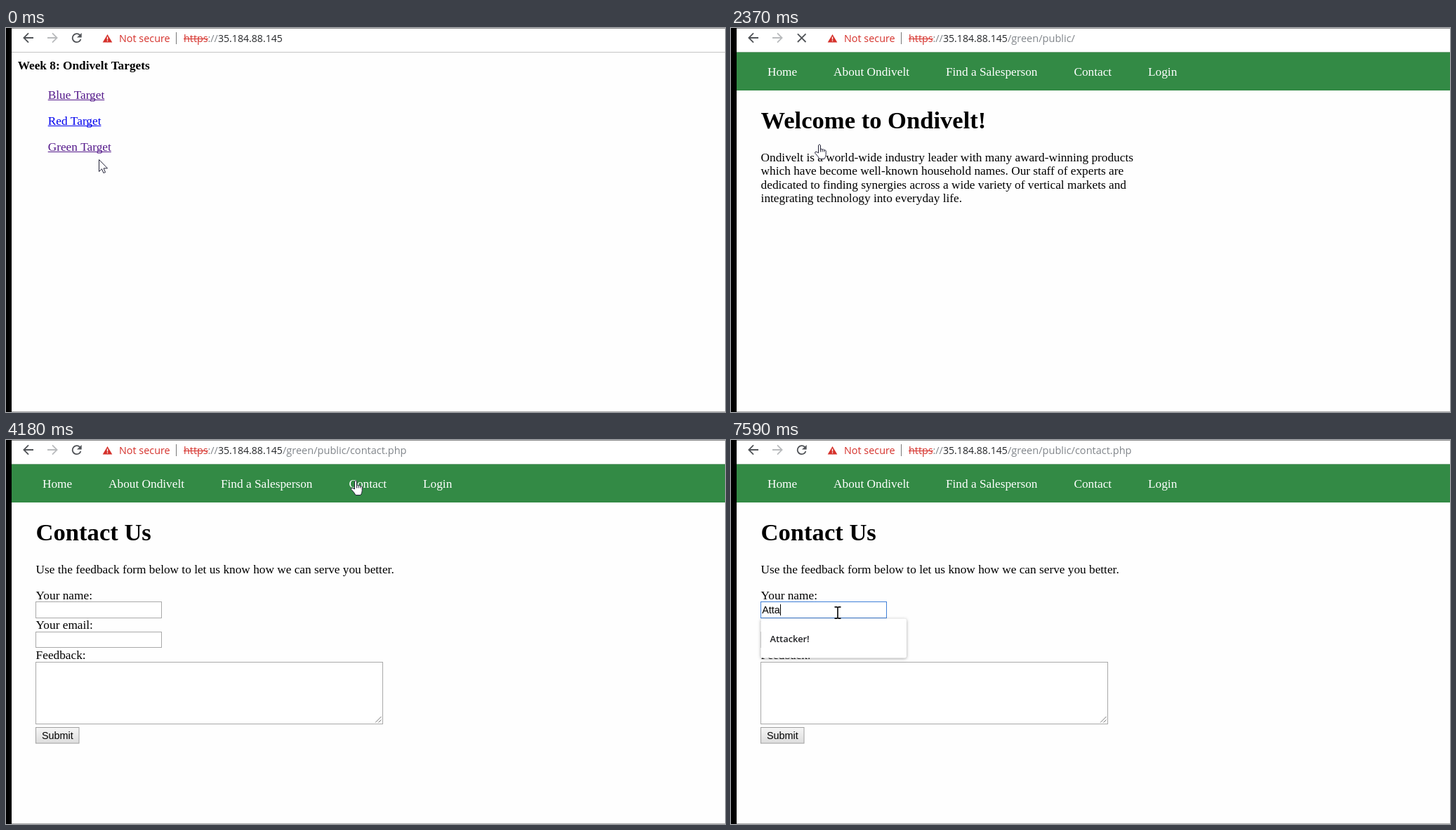
These frames come from a looping animation (1024x547 px, 8 s). An HTML page with a canvas:

```html
<!DOCTYPE html>
<html lang="en">
<head>
<meta charset="utf-8">
<title>Contact form walkthrough</title>
<style>
  html, body { margin: 0; width: 100%; height: 100%; overflow: hidden; background: #fefefe; }
  canvas { display: block; }
</style>
</head>
<body>
<canvas id="stage" width="1024" height="547"></canvas>
<script>
const ctx = document.getElementById('stage').getContext('2d');
const LOOP = 8000;
const EM = 17.3;
const BRAND = 'Ondivelt';
const EMAIL = 'tairil4173@example.com';

const serif = `${EM}px "Liberation Serif", serif`;
const sans = '14.4px "Liberation Sans", sans-serif';
const ui = (size, weight = 400) => `${weight} ${size}px "Open Sans", sans-serif`;

// Each entry holds from its start time until the next: [ms, kind, x, y]
const POINTER = [
  [0, 'arrow', 132.5, 187.5],
  [1150, 'arrow', 132.5, 185.5],
  [1290, 'arrow', 129.5, 180.5],
  [1415, 'hand', 122, 171],
  [1540, 'hand', 120, 167],
  [1690, 'hand', 119, 165],
  [2920, 'beam', 280, 132],
  [3070, 'arrow', 462.5, 98.5],
  [3200, 'arrow', 495.5, 76.5],
  [3350, 'hand', 490, 62],
  [3470, 'hand', 491, 57],
  [4580, 'arrow', 276.5, 195.5],
  [4720, 'arrow', 165.5, 211.5],
  [4840, 'beam', 152, 246]
];

// What the name field holds: [ms, text, caret x, caret visible]
const TYPING = [
  [5400, '', 45, true],
  [5960, '', 45, false],
  [6110, 'A', 53, true],
  [6670, 'A', 53, false],
  [6940, 'At', 57, true],
  [7340, 'Att', 62, true],
  [7590, 'Atta', 70, true]
];

const shapes = {
  arrow: new Path2D('M0 0V17L4 13.3L6.4 19L9 18L6.6 12.4H12Z'),
  hand: new Path2D('M5.5 13V2Q7 -.5 8.5 2V8Q9.8 6.3 11 8.3Q12.5 6.9 13.7 9Q15.3 8 16.2 10V15.5' +
    'Q16 18.5 14 21.5H7Q5 17.5 .8 13.4Q0 11.5 2 11.2Q4 11.8 5.5 13Z' +
    'M8.5 8V11.5M11 8.3V11.5M13.7 9V11.5'),
  beam: new Path2D('M-4.5 -8.2H-1.2L0 -7.2L1.2 -8.2H4.5M0 -7.2V7.2M-4.5 8.2H-1.2L0 7.2L1.2 8.2H4.5'),
  back: new Path2D('M7 0H-6.5M0 -6.6L-6.6 0L0 6.6'),
  cross: new Path2D('M-5.8 -5.8L5.8 5.8M5.8 -5.8L-5.8 5.8'),
  warning: new Path2D('M0 -5.8L6.8 5.8H-6.8Z')
};

const current = (keys, t) => keys.filter(key => key[0] <= t).pop();

function text(str, x, y, font, color = '#000') {
  ctx.font = font;
  ctx.fillStyle = color;
  ctx.fillText(str, x, y);
  return ctx.measureText(str).width;
}

function rect(x, y, w, h, color) {
  ctx.fillStyle = color;
  ctx.fillRect(x, y, w, h);
}

function box(x, y, w, h, border, fill = '#fff') {
  rect(x, y, w, h, border);
  rect(x + 1, y + 1, w - 2, h - 2, fill);
}

function strokeShape(path, x, y, color, width, flip = 1) {
  ctx.save();
  ctx.translate(x, y);
  ctx.scale(flip, 1);
  ctx.strokeStyle = color;
  ctx.lineWidth = width;
  ctx.stroke(path);
  ctx.restore();
}

function fillShape(path, x, y, color) {
  ctx.save();
  ctx.translate(x, y);
  ctx.fillStyle = color;
  ctx.fill(path);
  ctx.restore();
}

function reloadIcon(x, y) {
  ctx.strokeStyle = '#505357';
  ctx.lineWidth = 1.8;
  ctx.beginPath();
  ctx.arc(x, y, 6, 0.3, Math.PI * 1.77);
  ctx.stroke();
  fillShape(new Path2D('M7 -7.3V-.6H.3Z'), x, y, '#505357');
}

function toolbar(t) {
  const opening = t >= 4020 && t < 4180;
  const loading = opening || (t >= 2090 && t < 2520);
  const path = t >= 4020 ? '/green/public/contact.php' : t >= 2370 ? '/green/public/' : '';
  rect(8, 0, 1016, 34, '#fff');
  rect(8, 0, 1016, 1, '#8f8f8f');
  rect(8, 34, 1016, 1, '#c4c4c4');
  if (opening) rect(110, 7, 460, 17, '#f3f3f3');
  strokeShape(shapes.back, 32, 14, '#505357', 1.8);
  strokeShape(shapes.back, 66, 14, '#b9bbbd', 1.8, -1);
  if (loading) strokeShape(shapes.cross, 100.7, 14.2, '#505357', 1.8);
  else reloadIcon(100.7, 14.2);

  const red = '#d5302a', grey = '#80858a';
  fillShape(shapes.warning, 144.5, 14.8, red);
  rect(143.8, 12.5, 1.4, 4, '#fff');
  rect(143.8, 17.5, 1.4, 1.4, '#fff');
  text('Not secure', 161, 20, ui(14.4), red);
  rect(242, 6, 1, 17, '#777');
  text('https', 253, 20, ui(14.4), red);
  rect(253, 15, 35, 1, red);
  text('://', 287.5, 20, ui(14.3), grey);
  text('35.184.88.145', 302, 20, ui(14.1), '#25272a');
  text(path, 394, 20, ui(14.55), grey);
}

function link(label, y, color) {
  const width = text(label, 59.7, y, serif, color);
  rect(59.7, y + 1, width, 1, color);
}

function targetsPage(t) {
  const visited = '#551a8b';
  const pressed = t >= 1940 && t < 2090;
  text(`Week 8: ${BRAND} Targets`, 16.7, 58.5, 'bold ' + serif);
  link('Blue Target', 101, visited);
  link('Red Target', 138, '#0000ee');
  link('Green Target', 175, pressed ? '#ff0000' : visited);
}

function navBar() {
  rect(8, 34.5, 1016, 54.5, '#338a45');
  let x = 51.9;
  for (const label of ['Home', `About ${BRAND}`, 'Find a Salesperson', 'Contact', 'Login'])
    x += text(label, x, 68.3, serif, '#fff') + 3 * EM;
}

function article(title, lines) {
  navBar();
  text(title, 42.6, 143.3, `bold ${2 * EM}px "Liberation Serif", serif`);
  lines.forEach((line, i) => text(line, 42.6, 189.8 + i * 19.45, serif));
}

function homePage() {
  article(`Welcome to ${BRAND}!`, [
    `${BRAND} is a world-wide industry leader with many award-winning products`,
    'which have become well-known household names. Our staff of experts are',
    'dedicated to finding synergies across a wide variety of vertical markets and',
    'integrating technology into everyday life.'
  ]);
}

function popup(w, h) {
  ctx.save();
  ctx.shadowColor = 'rgba(0,0,0,.35)';
  ctx.shadowBlur = 4;
  ctx.shadowOffsetY = 1;
  ctx.fillStyle = '#fff';
  ctx.beginPath();
  ctx.roundRect(42.5, 254.5, w, h, 3);
  ctx.fill();
  ctx.restore();
}

function suggestions(typed) {
  const bold = ui(12.9, 600), plain = ui(13.3), grey = '#70757a';
  if (typed) {
    popup(207.5, 56);
    text('Attacker!', 55.5, 288, bold, '#202124');
    return;
  }
  popup(324, 140.5);
  ['Devkiram D Tairil', 'Devkiram'].forEach((name, i) => {
    text(name, 55.5, 288 + i * 39, bold, '#202124');
    text(EMAIL, 199, 288 + i * 39, plain, grey);
  });
  text('Manage...', 55.5, 379, plain, grey);
}

function contactPage(t) {
  const field = current(TYPING, t);
  article('Contact Us', ['Use the feedback form below to let us know how we can serve you better.']);
  ['Your name:', 'Your email:', 'Feedback:'].forEach((label, i) =>
    text(label, 42.6, 226.6 + i * 42.5, serif));
  box(42, 230, 180, 24, field ? '#3f7fd8' : '#a9a9a9');
  box(42, 273, 180, 23, '#a9a9a9');
  box(42, 316, 495, 89, '#a9a9a9');
  strokeShape(new Path2D('M526 402.5L534.5 394M530.5 402.5L534.5 398.5'), 0, 0, '#777', 1);

  const shade = ctx.createLinearGradient(0, 409, 0, 432);
  shade.addColorStop(0, '#f6f6f6');
  shade.addColorStop(1, '#dddddd');
  box(42, 409, 62.5, 23.5, '#a0a0a0', shade);
  text('Submit', 51, 426, sans);

  if (field) {
    const [, typed, caretX, caretOn] = field;
    text(typed, 44.2, 247, sans);
    if (caretOn) rect(caretX, 234, 1, 16, '#000');
    suggestions(typed);
  }
}

function pointer(t) {
  const [, kind, x, y] = current(POINTER, t);
  if (kind === 'beam') {
    strokeShape(shapes.beam, x, y, '#111', 1.7);
    return;
  }
  fillShape(shapes[kind], x, y, '#fff');
  strokeShape(shapes[kind], x, y, '#25253a', 1);
}

function draw(now) {
  const t = now % LOOP;
  rect(0, 0, 1024, 547, '#fefefe');
  toolbar(t);
  if (t >= 4180) contactPage(t);
  else if (t >= 2370) homePage();
  else targetsPage(t);
  rect(8, 546, 1016, 1, '#aaa');
  rect(0, 0, 8, 547, '#000');
  pointer(t);
  requestAnimationFrame(draw);
}
requestAnimationFrame(draw);
</script>
</body>
</html>
```
